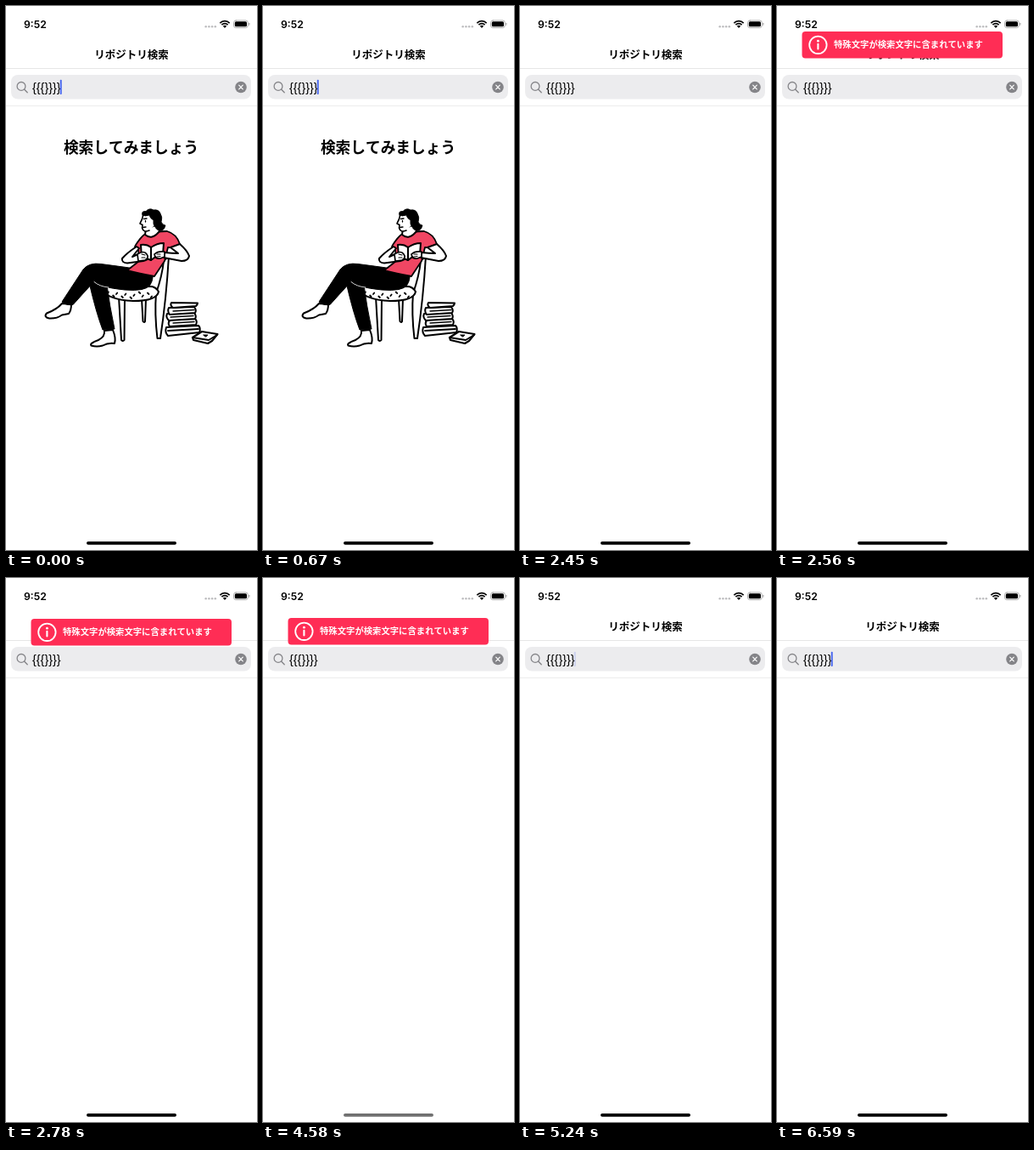
An HTML page with a canvas for the animation above (6670 ms loop, 296 by 640 pixels).

```html
<!DOCTYPE html>
<html lang="ja">
<head>
<meta charset="utf-8">
<title>リポジトリ検索</title>
<style>
html, body { margin: 0; width: 100%; height: 100%; overflow: hidden; background: #fff; }
canvas { display: block; width: 296px; height: 640px; }
</style>
</head>
<body>
<canvas id="stage"></canvas>
<script>
const W = 296, H = 640, LOOP = 6670;
const JP = '"Noto Sans CJK JP", "Noto Sans CJK", sans-serif';
const RED = '#ff2d55', SHIRT = '#f04663', INK = '#000', PAPER = '#fff';

const canvas = document.getElementById('stage');
const ctx = canvas.getContext('2d');
const dpr = window.devicePixelRatio || 1;
canvas.width = W * dpr;
canvas.height = H * dpr;

// Each track is a list of [start time, value]; values hold until the next one.
const caretTrack = [
  [0, 1], [190, .5], [310, .12], [550, .5], [670, 1],
  [1210, .5], [1320, .12], [1560, .5], [1680, 1],
  [2220, .5], [2330, .12], [2450, 0],
  [5010, 1], [5120, .6], [5240, .2], [5470, .6], [5580, 1],
  [6120, .5], [6230, .12], [6470, .5], [6590, 1]
];
const bannerTrack = [[0, null], [2560, 30], [2670, 45], [2780, 48], [4580, 47], [4690, -6], [4790, null]];
const homeTrack = [[0, 0], [4580, 112], [5010, 80], [5120, 36], [5240, 0]];
const HIDE_ART = 2450;

function at(track, t) {
  let value = track[0][1];
  for (const [start, v] of track) if (t >= start) value = v;
  return value;
}

function box(x, y, w, h, r, color) {
  ctx.beginPath();
  ctx.roundRect(x, y, w, h, r);
  ctx.fillStyle = color;
  ctx.fill();
}

function disc(x, y, r, color) {
  ctx.beginPath();
  ctx.arc(x, y, r, 0, Math.PI * 2);
  ctx.fillStyle = color;
  ctx.fill();
}

function ring(x, y, r, color, width) {
  ctx.beginPath();
  ctx.arc(x, y, r, 0, Math.PI * 2);
  ctx.strokeStyle = color;
  ctx.lineWidth = width;
  ctx.stroke();
}

function line(d, color = INK, width = 1.8) {
  ctx.strokeStyle = color;
  ctx.lineWidth = width;
  ctx.stroke(new Path2D(d));
}

function shape(d, fill = PAPER, width = 2) {
  ctx.fillStyle = fill;
  ctx.fill(new Path2D(d));
  if (width) line(d, INK, width);
}

function text(str, x, y, font, color = INK, align = 'left') {
  ctx.font = font;
  ctx.fillStyle = color;
  ctx.textAlign = align;
  ctx.fillText(str, x, y);
}

function drawStatus() {
  text('9:52', 21, 25.7, '600 12.2px Inter, sans-serif');
  for (let i = 0; i < 4; i++) disc(235.7 + i * 3.7, 24.2, 1.25, '#bdbdbf');

  ctx.strokeStyle = INK;
  ctx.lineWidth = 1.7;
  ctx.lineCap = 'butt';
  for (const r of [8, 5.1]) {
    ctx.beginPath();
    ctx.arc(258, 25.7, r, -Math.PI * .75, -Math.PI * .25);
    ctx.stroke();
  }
  shape('M258 26L255.8 23.6Q258 21.8 260.2 23.6Z', INK, 0);
  ctx.lineCap = 'round';

  ctx.beginPath();
  ctx.roundRect(268.5, 17, 16.8, 8.6, 2.6);
  ctx.strokeStyle = '#a8a8a8';
  ctx.lineWidth = .9;
  ctx.stroke();
  box(269.8, 18.3, 14.2, 6, 1.5, INK);
  box(286.3, 19.8, 1.1, 3, .6, '#a8a8a8');
}

function drawSearch(caret) {
  text('リポジトリ検索', 148, 61.8, '700 12.5px ' + JP, INK, 'center');
  box(0, 73, W, 1, 0, '#e6e6e6');
  box(0, 117, W, 1, 0, '#ececec');
  box(6, 81, 283, 28.5, 8, '#ececee');

  ring(18, 94.4, 4.9, '#858589', 1.3);
  line('M21.7 98.2L25.2 101.7', '#858589', 1.4);
  text('{{{}}}}', 31, 100.5, '14.4px "Liberation Sans", sans-serif');

  disc(277, 95.5, 6.8, '#848488');
  line('M274.7 93.2L279.3 97.8M279.3 93.2L274.7 97.8', PAPER, 1.2);

  ctx.globalAlpha = caret;
  box(63.8, 86.8, 1.9, 17.2, .8, '#4463ee');
  ctx.globalAlpha = 1;
}

function drawChair() {
  shape('M160 344L161.5 371Q163 373 164 371L165 344Z');
  shape('M133 342L136 393Q138 395 139.5 393L140 344Z');
  shape('M192 294Q189 345 182 391L178.5 391Q175 362 177 338Q184 318 186 300Z');
  shape('M108 330Q119 346 150 347Q178 347 180 336Q176 329 168 330L112 327Z');
  for (let i = 0; i < 11; i++) {
    const x = 121 + i * 5.1, y = 336.5 + (i * 4) % 7;
    line(`M${x} ${y}l${i % 2 ? 1.6 : -1.2} 1.5`, INK, 1.8);
  }
}

function drawBooks() {
  shape('M189 378L227 376Q230 379 228 384L191 388Q187 384 189 378Z');
  line('M191 382L227 380');
  shape('M194 369L223 368Q226 371 224 375L193 377Q190 373 194 369Z');
  shape('M190 362L222 361Q225 365 223 368L192 370Q188 366 190 362Z');
  shape('M192 355L222 354Q225 358 223 361L193 363Q190 359 192 355Z');
  shape('M195 349L226 349.5Q226 351 224 353L197 355Q193 352 195 349Z');
  line('M197 359L222 357.5M194 366L221 364.5M197 373L222 371.5', INK, 1.3);
  shape('M220 390L231 383L249.5 386L243 394L238 397L221 393Z', PAPER, 2.2);
  line('M220 390L239 393L249 387');
  shape('M233 387L238 387L236 389Z', INK, 1);
}

function drawLegs() {
  shape('M66 350Q60 357 48 361.5Q44 366 51 367.5Q60 368 66 363.5L74 362Q77 358 77 351Z');
  shape('M116 382Q117 389 109 393Q98 397 100.5 399.5Q107 401.5 114 399.5Q120 396 128 397Q130 391 126 381Z');
  shape('M98 325Q106 360 114 381L128 380Q122 352 119 328Z', INK, 1);
  shape('M172 312Q140 307 112 303.5Q98 301.5 91 310L66 348Q71 352.5 79 351.5Q91 338 104 324Q110 331 140 334Q165 336 170 328Q175 320 172 312Z', INK, 1);
  line('M104 324.5Q110 330 121 331', PAPER, .8);
}

function drawTorso() {
  shape('M163 269Q176 265 190 265Q201 268 205 280Q199 285 191 284L187 300L175 318Q155 314 143 311L157 300L156 285Q150 285 153 281Q159 272 163 269Z', SHIRT, 1.8);
  shape('M165 262L164 269Q172 276 181 265L179 257Z');
  shape('M162 245Q161 251 158 256L161 257.5L160.5 261Q162 267 169 264L176 257L177 246Z', PAPER, 0);
  line('M162 245Q161 251 158 256L161 257.5L160.5 261Q162 267 169 264', INK, 1.6);
  line('M162.5 250.5L166 250M164.5 252.5L164.5 254M161 260.5L165 260', INK, 1.3);
  shape('M161 246Q159 241 165 241.5Q169 237 174 240Q180 239 182 244Q185 249 183 254Q185 258 188 258Q187 263 184 264Q178 265 176 260Q173 257 174 252Q170 250 169 246Q164 248 161 246Z', INK, .8);
}

function drawReading() {
  shape('M205 280Q214 288 216 294Q215 300 207 300L186 296L187 290Q196 291 203 291L194 284Z');
  shape('M154 283Q142 291 137 297Q136 302 143 302.5L162 300Q168 299 168 294L158 291L149 295L157 285Z');
  shape('M159 281Q166 280 171 284L171 299Q165 296 160 296Z');
  shape('M171 284Q178 279 186 279L185 292Q178 293 171 299Z');
  shape('M155 292Q163 287 166 292Q169 296 164 299L156 300Z', PAPER, 1.7);
  shape('M187 289Q179 288 175 292Q176 298 182 297L187 295Z', PAPER, 1.7);
  line('M160 292L164 293M160 296L164 296M178 292L182 292M178 295L182 294.5', INK, 1.2);
}

function drawArt() {
  text('検索してみましょう', 147.5, 173.4, '700 17.7px ' + JP, INK, 'center');
  drawChair();
  drawBooks();
  drawLegs();
  drawTorso();
  drawReading();
}

function drawBanner(y) {
  box(29.5, y, 236.5, 31.5, 4, RED);
  ring(48.4, y + 15.8, 10.2, PAPER, 1.8);
  disc(48.4, y + 11.2, 1.4, PAPER);
  line(`M48.4 ${y + 14.8}V${y + 20.5}`, PAPER, 2.1);
  text('特殊文字が検索文字に含まれています', 67, y + 19.4, '700 10.35px ' + JP, PAPER);
}

function draw(t) {
  ctx.setTransform(dpr, 0, 0, dpr, 0, 0);
  ctx.fillStyle = PAPER;
  ctx.fillRect(0, 0, W, H);
  ctx.lineCap = ctx.lineJoin = 'round';

  drawStatus();
  drawSearch(at(caretTrack, t));
  if (t < HIDE_ART) drawArt();

  const y = at(bannerTrack, t);
  if (y !== null) drawBanner(y);

  const shade = at(homeTrack, t);
  box(95, 629.9, 106, 3.9, 2, `rgb(${shade}, ${shade}, ${shade})`);
}

const begin = performance.now();
function tick() {
  draw((performance.now() - begin) % LOOP);
  requestAnimationFrame(tick);
}
tick();
</script>
</body>
</html>
```
